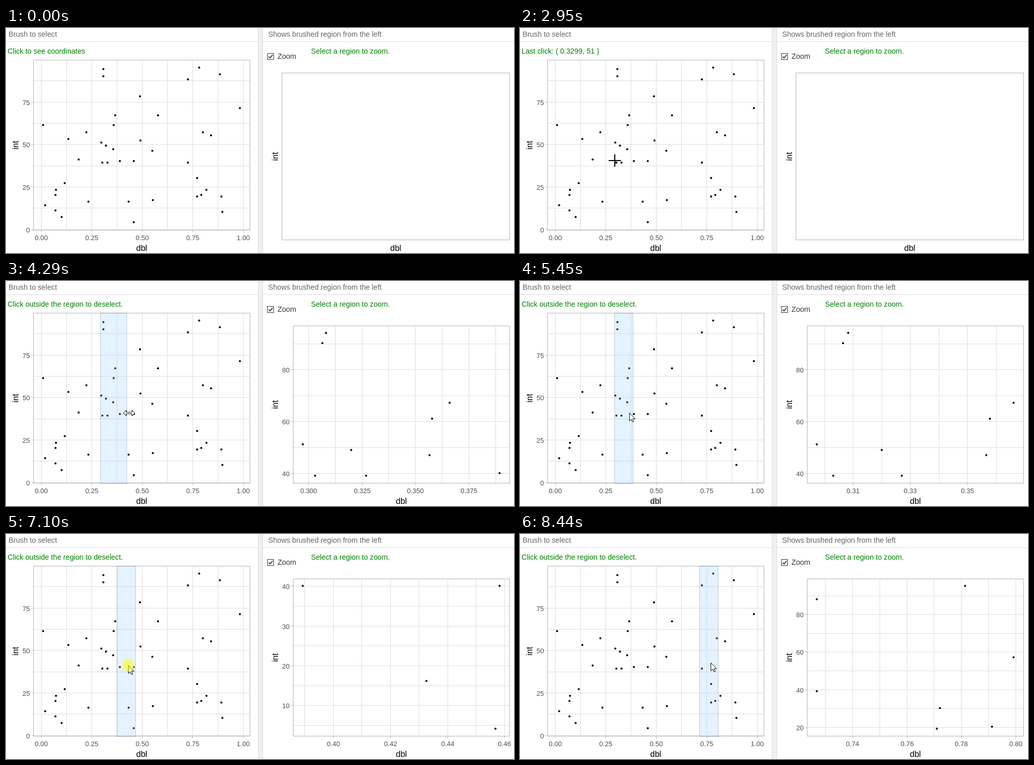
Recreate the animation shown at these times as an HTML page. Size 986 by 438 pixels, loop 9370 ms.

```html
<!DOCTYPE html>
<html lang="en">
<head>
<meta charset="utf-8">
<title>Brush and zoom</title>
<style>
  html, body { margin: 0; width: 100%; height: 100%; overflow: hidden; background: #fff; }
  svg { display: block; font-family: "Liberation Sans", Arial, sans-serif; }
  .ui { font-size: 14.2px; }
  .header { fill: #666; }
  .info { fill: green; }
  .tick { font-size: 13px; fill: #4d4d4d; }
  .title { font-size: 16px; text-anchor: middle; }
  .grid { stroke: #dedede; fill: none; }
  .frame { stroke: #b3b3b3; fill: none; }
</style>
</head>
<body>
<svg id="stage" width="986" height="438" viewBox="0 0 986 438">
  <rect width="986" height="438" fill="#fff"/>
  <rect x="489" width="10" height="438" fill="#f0f0f0"/>
  <path d="M489.5 0V438M498.5 0V438M0 26.5H489M499 26.5H986" stroke="#ddd"/>
  <g class="ui">
    <text class="header" x="5" y="17">Brush to select</text>
    <text class="header" x="509" y="17">Shows brushed region from the left</text>
    <text class="info" id="message" x="3" y="50"></text>
    <text class="info" x="592" y="50">Select a region to zoom.</text>
    <text x="527" y="60" fill="#333">Zoom</text>
  </g>
  <rect x="507.5" y="49.5" width="12" height="12" fill="#fff" stroke="#333"/>
  <path d="M509.8 55.6L512.5 58.3L517.5 52.3" fill="none" stroke="#222" stroke-width="1.6"/>
  <g id="plots"></g>
  <rect id="brush" y="62.5" height="332" fill="#9cf" stroke="#036" opacity=".25"/>
  <g id="cursor">
    <path id="cross" d="M0 -12V12M-12 0H12" stroke="#000" stroke-width="2"/>
    <path id="resize" d="M-11 0L-5.5 -5.5V-1.5H5.5V-5.5L11 0L5.5 5.5V1.5H-5.5V5.5Z" fill="#fff" stroke="#000"/>
    <path id="arrow" d="M.5 .8V16.5L4 13.2L6.6 18.5L9 17.4L6.5 12.2H11.5Z" fill="#fff" stroke="#000"/>
    <circle id="press" r="12" fill="#ff0" opacity=".5"/>
  </g>
</svg>
<script>
const LOOP = 9370, TICK = 78;
const $ = id => document.getElementById(id);

// The plotted data set: [dbl, int]
const points = [
  [.0095, 61], [.0204, 14], [.0705, 11], [.0705, 20], [.074, 23], [.102, 7], [.1173, 27], [.1352, 53],
  [.1862, 41], [.2235, 57], [.2347, 16], [.2973, 51], [.303, 39], [.3065, 90], [.3082, 94], [.32, 49],
  [.327, 39], [.3565, 47], [.3578, 61], [.366, 67], [.3893, 40], [.4326, 16], [.4568, 4], [.4582, 40],
  [.4885, 78], [.4915, 52], [.55, 46], [.553, 17], [.579, 67], [.7268, 88], [.7268, 39], [.771, 19],
  [.7721, 30], [.7814, 95], [.7912, 20], [.7992, 57], [.818, 23], [.841, 55], [.8845, 91], [.892, 19],
  [.8975, 10], [.983, 71]
];

function add(parent, tag, attrs, text) {
  const el = document.createElementNS("http://www.w3.org/2000/svg", tag);
  for (const key in attrs) el.setAttribute(key, attrs[key]);
  if (text !== undefined) el.textContent = text;
  parent.appendChild(el);
  return el;
}

function panel(left, top, right, bottom, titleX) {
  const g = add($("plots"), "g", {});
  add(g, "text", { class: "title", x: (left + right) / 2, y: 434 }, "dbl");
  add(g, "text", { class: "title", transform: `translate(${titleX} ${(top + bottom) / 2}) rotate(-90)` }, "int");
  add(g, "rect", { class: "frame", x: left, y: top, width: right - left, height: bottom - top });
  return g;
}

// Linear scale with 5% padding at both ends
function makeScale(values, start, end) {
  const min = Math.min(...values), max = Math.max(...values);
  const pad = (max - min) * .05, lo = min - pad, hi = max + pad;
  return { lo, hi, at: v => start + (v - lo) / (hi - lo) * (end - start) };
}

// Calls draw(value, isMajor) for each grid line; every second one is major
function eachBreak({ lo, hi }, step, odd, draw) {
  for (let k = Math.ceil(lo / step); k * step <= hi; k++) draw(k * step, (k + odd) % 2 === 0);
}

function scatter({ box, titleX, from, to, stepX, odd = 0, digits = 2, stepY }) {
  const [left, top, right, bottom] = box;
  const g = panel(...box, titleX);
  const shown = points.filter(p => p[0] >= from && p[0] <= to);
  const sx = makeScale(shown.map(p => p[0]), left, right);
  const sy = makeScale(shown.map(p => p[1]), bottom, top);
  eachBreak(sx, stepX, odd, (v, major) => {
    const x = Math.floor(sx.at(v) - .5) + .5;
    add(g, "path", { class: "grid", d: `M${x} ${top + .5}V${bottom - .5}` });
    if (!major) return;
    add(g, "path", { class: "frame", d: `M${x} ${bottom}v4` });
    add(g, "text", { class: "tick", x, y: 413, "text-anchor": "middle" }, v.toFixed(digits));
  });
  eachBreak(sy, stepY, 0, (v, major) => {
    const y = Math.floor(sy.at(v) + .45) + .5;
    add(g, "path", { class: "grid", d: `M${left + .5} ${y}H${right - .5}` });
    if (!major) return;
    add(g, "path", { class: "frame", d: `M${left} ${y}h-4` });
    add(g, "text", { class: "tick", x: left - 7, y: y + 5, "text-anchor": "end" }, v);
  });
  for (const [x, y] of shown) add(g, "circle", { cx: Math.floor(sx.at(x)), cy: Math.floor(sy.at(y)), r: 2 });
  return g;
}

const zoomed = (from, to, rest) =>
  scatter({ box: [557.5, 87.5, 977.5, 393.5], titleX: 528, from, to, stepX: .01, stepY: 10, ...rest });

scatter({ box: [53.5, 62.5, 473.5, 393.5], titleX: 23.5, from: 0, to: 1, stepX: .125, stepY: 12.5 });

// Each view dims the previous one from `busy` until it is `ready`
const views = [
  { busy: 0, ready: 0, plot: panel(535.5, 87.5, 977.5, 412.5, 528) },
  { busy: 3970, ready: 4290, plot: zoomed(.295, .425, { stepX: .0125, digits: 3 }) },
  { busy: 5150, ready: 5310, plot: zoomed(.295, .385, { odd: 1 }) },
  { busy: 6400, ready: 6800, plot: zoomed(.375, .47, { stepY: 5 }) },
  { busy: 8120, ready: 8440, plot: zoomed(.715, .81) }
];

function messageAt(t) {
  if (t < 1780) return "Click to see coordinates";
  if (t < 4290) return `Last click: ( ${t < 2650 ? "0.2755, 52" : "0.3299, 51"} )`;
  return "Click outside the region to deselect.";
}

// Pointer path: moves from the previous place to (x, y) between start and end.
// A held button stays down until the next move; a press without a move is a click.
const HELD = true;
const path = [
  [0, 0, 436, 357],
  [210, 600, 145, 236],
  [600, 750, 170, 220],
  [920, 1000, 176, 220],
  [1300, 1300, 176, 220, HELD],
  [1780, 2100, 198, 222],
  [2250, 2250, 198, 222, HELD],
  [2650, 2950, 184, 258],
  [3190, 3270, 215, 258, HELD],
  [3430, 3660, 234, 258, HELD],
  [3740, 3820, 239, 257],
  [4670, 4750, 224, 257, HELD],
  [5150, 5700, 196, 255],
  [5860, 6160, 228, 255, HELD],
  [6400, 6480, 237, 255],
  [7100, 7420, 330, 255, HELD],
  [7580, 7720, 370, 250, HELD]
];

function pointerAt(t) {
  const i = path.findLastIndex(move => move[0] <= t);
  const [start, end, toX, toY, held] = path[i];
  const [, , fromX, fromY] = path[Math.max(0, i - 1)];
  const steps = Math.round((end - start) / TICK);
  const p = steps ? Math.min(1, Math.floor((t - start) / (end - start) * steps + .01) / steps) : 1;
  const release = end > start && path[i + 1] ? path[i + 1][0] : end + TICK;
  return {
    x: Math.round(fromX + (toX - fromX) * p),
    y: Math.round(fromY + (toY - fromY) * p),
    pressed: Boolean(held) && t < release
  };
}

// Drawn, narrowed by its right edge, then dragged twice
function brushAt(t, x) {
  if (t < 4670) return [183, Math.min(x, 234)];
  if (t < 5150) return [183, x - 5];
  const left = t < 5860 ? 183 : t < 6400 ? x - 13 : t < 7100 ? 215 : x - 22;
  return [left, left + 36];
}

const show = (el, on) => el.setAttribute("display", on ? "inline" : "none");

function render(t) {
  const { x, y, pressed } = pointerAt(t);
  const [left, right] = brushAt(t, x);
  const view = views.findLast(v => v.ready <= t);
  const next = views.find(v => v.ready > t);
  const wait = next && t >= next.busy ? Math.floor((t - next.busy) / 80) : -1;
  const opacity = wait < 0 ? 1 : Math.max(.35, .85 - wait / 8);

  $("message").textContent = messageAt(t);
  $("message").setAttribute("opacity", opacity);
  for (const v of views) show(v.plot, v === view);
  view.plot.setAttribute("opacity", opacity);

  show($("brush"), t >= 3190 && right > left);
  $("brush").setAttribute("x", left + .5);
  $("brush").setAttribute("width", Math.max(0, right - left));

  const shape = t < 3740 ? "cross" : t < 5700 && x > 214 ? "resize" : "arrow";
  for (const id of ["cross", "resize", "arrow"]) show($(id), id === shape);
  show($("cursor"), t >= 210);
  $("cursor").setAttribute("transform", `translate(${x} ${y})`);
  show($("press"), pressed);
}

const began = performance.now();
function frame() {
  render((performance.now() - began) % LOOP);
  requestAnimationFrame(frame);
}
frame();
</script>
</body>
</html>
```
